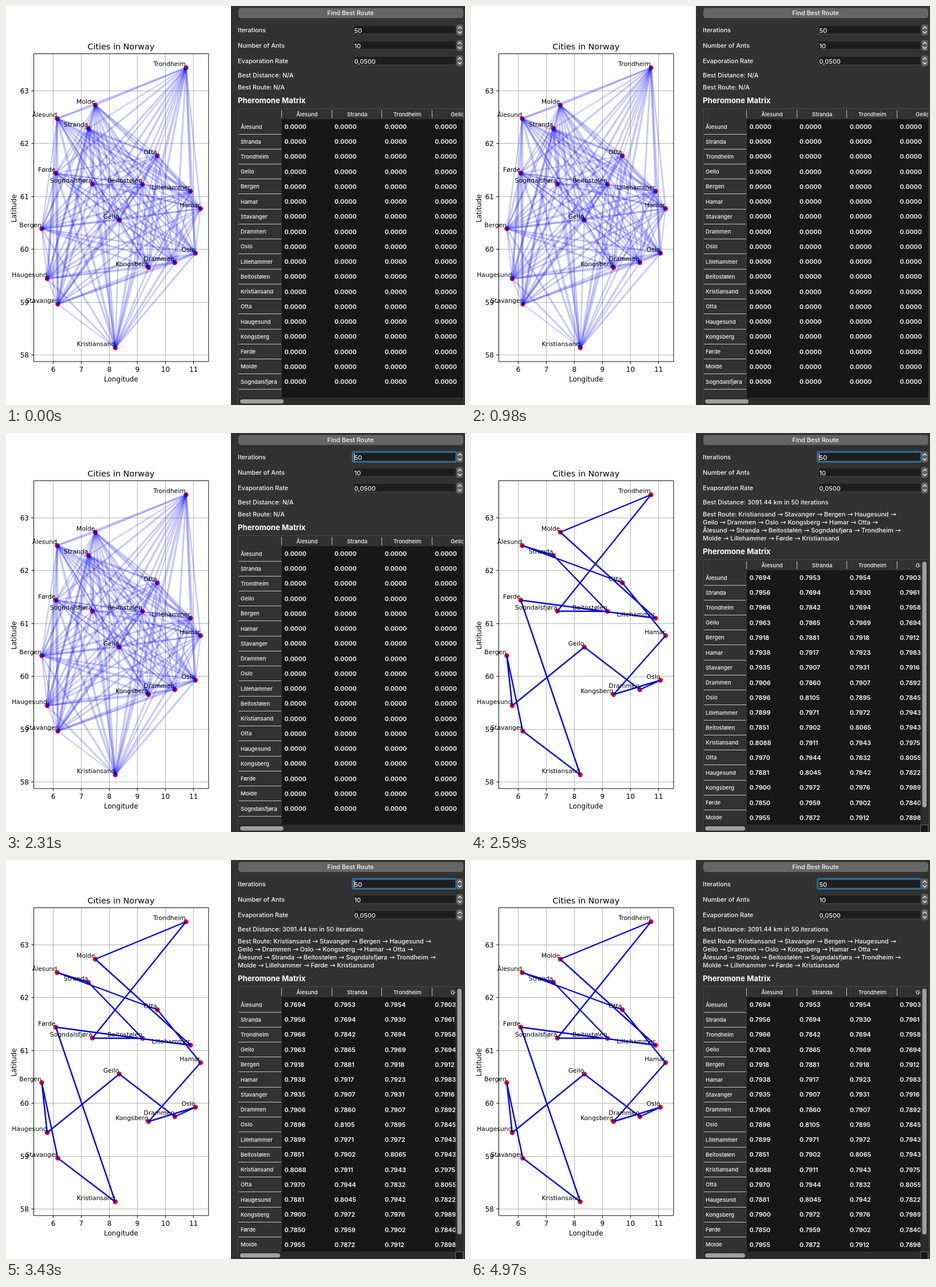
An HTML page that plays this animation: 802 by 698 pixels, repeating every 5040 ms.

```html
<!DOCTYPE html>
<html lang="en">
<head>
<meta charset="utf-8">
<title>Ant colony route finder</title>
<style>
  html, body { margin: 0; width: 100%; height: 100%; overflow: hidden; background: #fff; }
  svg { display: block; width: 100vw; height: 100vh; }
  text { white-space: pre; }
  .plot { font: 12px "DejaVu Sans", sans-serif; fill: #000; }
  .title { font-size: 14.4px; }
  .city { font-size: 10.8px; }
  .panel { font: 500 10.9px Inter, sans-serif; fill: #f6f6f6; }
  .head { font-size: 9.6px; }
  .cell { font-size: 10.8px; font-weight: 600; fill: #fff; }
  .bold { font-size: 13.2px; font-weight: 700; fill: #fff; }
  .arrow { font: 12px "DejaVu Sans", sans-serif; }
  .mid { text-anchor: middle; }
  .end { text-anchor: end; }

  .before, .after, .press, .ring, .caret { animation: 5040ms step-end infinite; }
  .before { animation-name: before; }
  .after { animation-name: after; }
  .press { animation-name: press; }
  .ring { animation-name: ring; }
  .caret { animation-name: caret; }
  @keyframes before { 0% { opacity: 1 } 51.389%, 100% { opacity: 0 } }
  @keyframes after { 0% { opacity: 0 } 51.389%, 100% { opacity: 1 } }
  @keyframes press { 0% { opacity: 0 } 44.444% { opacity: 1 } 45.833%, 100% { opacity: 0 } }
  @keyframes ring { 0% { opacity: 0 } 44.444%, 100% { opacity: 1 } }
  @keyframes caret {
    0% { opacity: 0 } 44.444% { opacity: 1 } 54.167% { opacity: 0 } 65.278% { opacity: 1 }
    76.389% { opacity: 0 } 87.5% { opacity: 1 } 98.611%, 100% { opacity: 0 }
  }
</style>
</head>
<body>
<svg id="stage" viewBox="0 0 802 698"></svg>
<script>
// name, x, y, then the visible part of the pheromone row
const cities = `Ålesund 89.5 197 7694 7953 7954 7903
Stranda 144 214 7956 7694 7930 7961
Trondheim 314.5 108 7966 7842 7694 7958
Geilo 198 374.5 7963 7865 7969 7694
Bergen 62.5 389.5 7918 7881 7918 7912
Hamar 340 354.5 7938 7917 7923 7983
Stavanger 90.5 521.5 7935 7907 7931 7916
Drammen 295 449 7906 7860 7907 7892
Oslo 331 432.5 7896 8105 7895 7845
Lillehammer 322.5 324 7899 7971 7972 7943
Beitostølen 238.5 312 7851 7902 8065 7943
Kristiansand 191 598 8088 7911 7943 7975
Otta 264.5 262 7970 7944 7832 8055
Haugesund 72 477 7881 8045 7942 7822
Kongsberg 249 457.5 7900 7972 7976 7989
Førde 87 292.5 7850 7959 7902 7840
Molde 156 173.5 7955 7872 7912 7898
Sogndalsfjøra 151 311.5`.split('\n').map(row => {
  const [name, x, y, ...trail] = row.split(' ');
  return { name, x: +x, y: +y, trail };
});

const route = [
  'Kristiansand → Stavanger → Bergen → Haugesund →',
  'Geilo → Drammen → Oslo → Kongsberg → Hamar → Otta →',
  'Ålesund → Stranda → Beitostølen → Sogndalsfjøra → Trondheim →',
  'Molde → Lillehammer → Førde → Kristiansand'
];

const range = n => [...Array(n).keys()];
const each = (list, fn) => list.map(fn).join('');
const text = (x, y, s, cls = '') => `<text x="${x}" y="${y}" class="${cls}">${s}</text>`;
const rect = (x, y, w, h, fill, more = '') =>
  `<rect x="${x}" y="${y}" width="${w}" height="${h}" fill="${fill}" ${more}/>`;
const path = (d, stroke, width, more = '') =>
  `<path d="${d}" fill="none" stroke="${stroke}" stroke-width="${width}" ${more}/>`;
const crisp = v => Math.floor(v) + 0.5;

let seed = 7;
const random = () => (seed = seed * 16807 % 2147483647) / 2147483647;

// Plot
const lonX = lon => 82.5 + (lon - 6) * 49.06;
const latY = lat => 148 + (63 - lat) * 92.5;
const lons = range(6).map(i => i + 6);
const lats = range(6).map(i => i + 58);

function web() {
  let out = '';
  cities.forEach((a, i) => cities.slice(i + 1).forEach(b => {
    const dist = Math.hypot(a.x - b.x, a.y - b.y);
    const width = 1.2 + dist / 500 * 2.2 + 1.4 * random();
    out += path(`M${a.x} ${a.y}L${b.x} ${b.y}`, '#00f', width.toFixed(2),
      'stroke-opacity=".21" stroke-linecap="square"');
  }));
  return out;
}

function tour() {
  const stops = route.join(' ').split(' → ').map(name => cities.find(c => c.name === name));
  return path('M' + stops.map(c => `${c.x} ${c.y}`).join('L'), '#0000e6', 2.4, 'stroke-linejoin="round"');
}

function plot() {
  const grid = each(lons, v => `M${crisp(lonX(v))} 83.5V622`) + each(lats, v => `M48.5 ${crisp(latY(v))}H354`);
  const ticks = each(lons, v => `M${crisp(lonX(v))} 622v4.2`) + each(lats, v => `M48.5 ${crisp(latY(v))}h-4.2`);
  return `<g class="plot">
    ${each(cities, c => `<circle cx="${c.x}" cy="${c.y}" r="4.2" fill="#f00000"/>`)}
    ${path(grid, '#b0b0b0', 0.96)}
    <g class="before">${web()}</g>
    <g class="after">${tour()}</g>
    ${path('M48.5 83.5H354V622H48.5Z' + ticks, '#000', 0.96)}
    ${each(lons, v => text(lonX(v), 640, v, 'mid'))}
    ${each(lats, v => text(40, latY(v) + 4.5, v, 'end'))}
    ${text(201, 657, 'Longitude', 'mid')}
    <text transform="translate(17.5 354) rotate(-90)" class="mid">Latitude</text>
    ${text(201, 76, 'Cities in Norway', 'title mid')}
    ${each(cities, c => text(c.x - 0.5, c.y - 2.6, c.name, 'city end'))}
  </g>`;
}

// Control panel
function spin(y, label, value) {
  return text(405, y + 4, label) +
    rect(608, y - 7, 177, 14, '#1d1d1d') + rect(608, y + 6.5, 177, 1, '#4a4a4a') +
    text(608.5, y + 4.5, value) +
    rect(787, y - 9.5, 11.5, 19, '#626262', 'rx="4"') +
    path(`M790 ${y - 2.7}l2.8 -2.8l2.8 2.8M790 ${y + 2.7}l2.8 2.8l2.8 -2.8`, '#f0f0f0', 1.3,
      'stroke-linecap="round" stroke-linejoin="round"');
}

function table(top, id, right, thumb, value) {
  const colX = i => 481.5 + i * 87.6;
  const rowY = i => top + 31 + i * 26.24;
  const lines = each(range(4), i => `M${crisp(colX(i))} ${top + 2}v14`) +
    each(cities, (c, i) => `M407 ${crisp(rowY(i) + 13)}H481`);
  return `<clipPath id="${id}">${rect(405, top, right - 405, 685 - top, '#000')}</clipPath>
    ${rect(405.5, top - 0.5, 393.5, 700 - top, '#323232', 'stroke="#484848"')}
    <g clip-path="url(#${id})">
      ${rect(482, top + 18, 320, 700, '#171717')}
      ${path(lines, '#c4c4c4', 1)}
      ${each(cities.slice(0, 4), (c, i) => text(colX(i) + 44.5, top + 12.5, c.name, 'head mid'))}
      ${each(cities, (c, i) => text(410, rowY(i) + 3.5, c.name, 'head') +
        each(range(4), j => text(486.5 + j * 87.6, rowY(i) + 4, value(c, j), 'cell')))}
    </g>
    ${rect(406, 685, 393, 13, '#2b2b2b')}
    ${rect(409, 688, thumb, 7.5, '#a0a0a0', 'rx="3.75"')}`;
}

function panel() {
  const lines = route.map((s, i) => (i ? '' : 'Best Route: ') + s);
  const arrows = s => s.replace(/→/g, '<tspan class="arrow">→</tspan>');
  return `<g class="panel">
    ${rect(393, 0, 409, 698, '#323232')}
    ${rect(406, 3.5, 393, 17.5, '#656565', 'rx="4.5"')}
    <g class="press">${rect(406, 3.5, 393, 17.5, '#7c7c7c', 'rx="4.5"')}</g>
    ${text(602, 16, 'Find Best Route', 'mid')}
    ${spin(42, 'Iterations', '50')}
    ${spin(69, 'Number of Ants', '10')}
    ${spin(96, 'Evaporation Rate', '0,0500')}
    <g class="ring">${rect(605.5, 33, 181, 17.5, 'none', 'rx="2.5" stroke="#2d6c96" stroke-width="2.8"')}</g>
    <g class="caret">${rect(608, 35.5, 1, 13, '#fff')}</g>
    <g class="before">
      ${text(405, 125, 'Best Distance: N/A')}
      ${text(405, 146, 'Best Route: N/A')}
      ${text(405, 169.5, 'Pheromone Matrix', 'bold')}
      ${table(180, 'wide', 799, 76, () => '0.0000')}
    </g>
    <g class="after">
      ${text(405, 125, 'Best Distance: 3091.44 km in 50 iterations')}
      ${each(lines, (s, i) => text(405, 146 + i * 14, arrows(s)))}
      ${text(405, 211.5, 'Pheromone Matrix', 'bold')}
      ${table(222, 'narrow', 785.5, 70, (c, j) => c.trail[j] ? '0.' + c.trail[j] : '')}
      ${rect(785.5, 222, 13.5, 463, '#2b2b2b')}
      ${rect(788.5, 225, 7.5, 430, '#a0a0a0', 'rx="3.75"')}
      ${rect(785.5, 685.5, 13, 13, '#171717', 'stroke="#6a6a6a"')}
    </g>
  </g>`;
}

document.getElementById('stage').innerHTML = plot() + panel();
</script>
</body>
</html>
```
